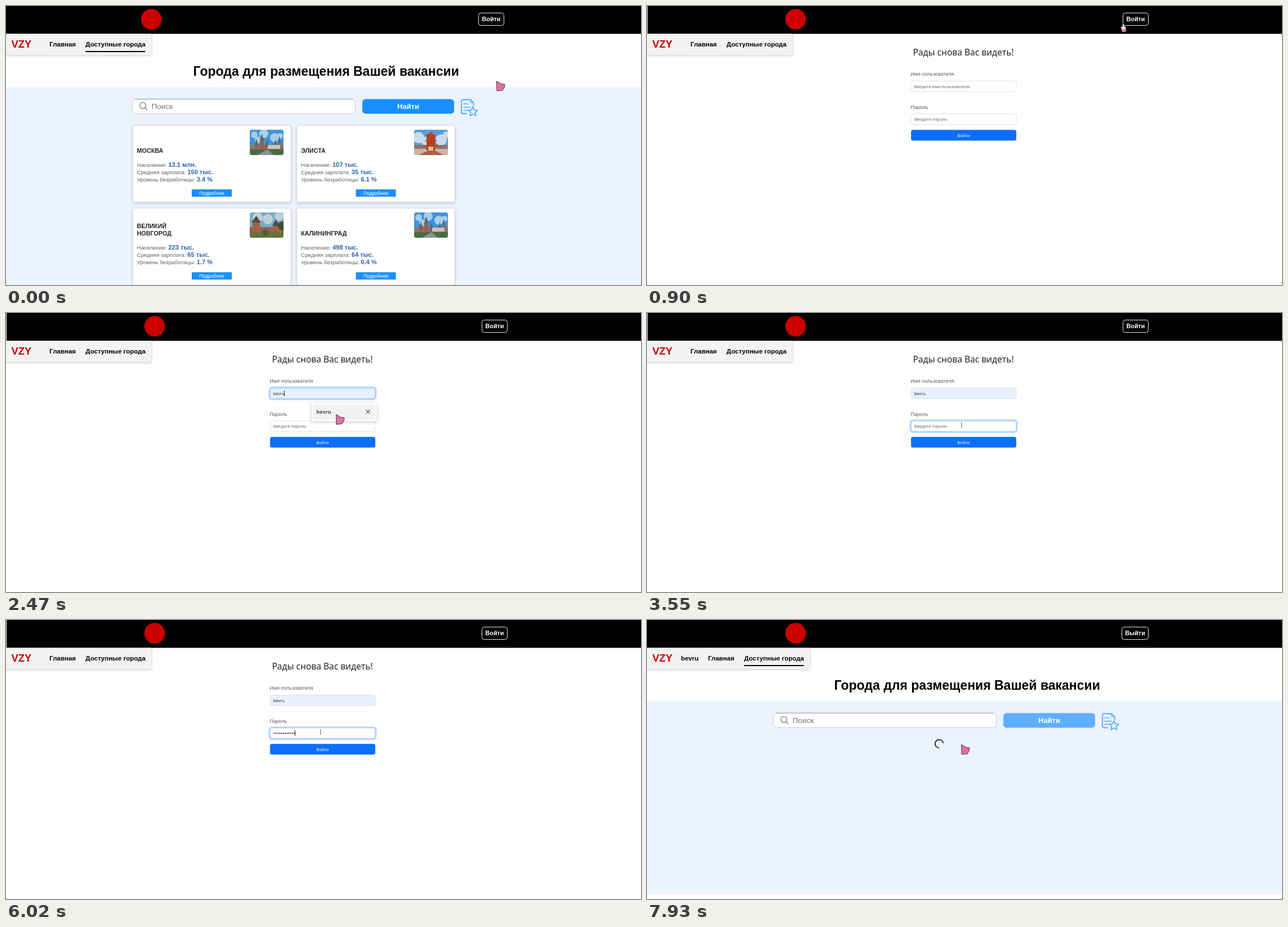
Write an HTML page with a canvas that moves like this. It is 1128 px wide and 496 px high and loops after 7990 ms.

```html
<!DOCTYPE html>
<html lang="ru">
<head>
<meta charset="utf-8">
<title>Города</title>
<style>
html, body { margin: 0; width: 100%; height: 100%; overflow: hidden; background: #fff; }
canvas { display: block; }
</style>
</head>
<body>
<canvas id="stage" width="1128" height="496"></canvas>
<script>
const ctx = document.getElementById('stage').getContext('2d');
const LOOP = 7990;
const ARIAL = '"Liberation Sans", Arial, sans-serif';
const NOTO = '"Noto Sans", "Open Sans", sans-serif';
const BRAND = 'VZY', USER = 'bevru';
const RED = '#cc0000', BLUE = '#1890ff', INK = '#212529';
const LOGIN_AT = 900, FOCUS_NAME = 1850, PICK = 2810, FOCUS_PASS = 3150, PRESS = 7300, CITIES_AT = 7790;
const KEY_TIMES = [3750, 3950, 4170, 4370, 4630, 4760, 4960, 5160, 5430, 5690, 5820, 6020];

// start, end, steps, target
const MOVES = [
  [70, 830, 11, 846, 33],
  [1160, 1850, 11, 596, 143],
  [2050, 2470, 7, 586, 180],
  [2880, 3150, 5, 558, 199],
  [6570, 7300, 12, 558, 221]
];

const CITIES = [
  { name: ['МОСКВА'], people: '13.1 млн.', pay: '150 тыс.', idle: '3.4 %', view: towers },
  { name: ['ЭЛИСТА'], people: '107 тыс.', pay: '35 тыс.', idle: '6.1 %', view: pagoda },
  { name: ['ВЕЛИКИЙ', 'НОВГОРОД'], people: '223 тыс.', pay: '65 тыс.', idle: '1.7 %', view: fortress },
  { name: ['КАЛИНИНГРАД'], people: '498 тыс.', pay: '64 тыс.', idle: '0.4 %', view: towers }
];

function rect(x, y, w, h, color) {
  ctx.fillStyle = color;
  ctx.fillRect(x, y, w, h);
}

function box(x, y, w, h, r, fill, stroke, line = 1) {
  ctx.beginPath();
  ctx.roundRect(x, y, w, h, r);
  if (fill) { ctx.fillStyle = fill; ctx.fill(); }
  if (stroke) { ctx.strokeStyle = stroke; ctx.lineWidth = line; ctx.stroke(); }
}

function shadowBox(x, y, w, h, r, fill, blur, dy, alpha) {
  ctx.save();
  ctx.shadowColor = `rgba(0,0,0,${alpha})`;
  ctx.shadowBlur = blur;
  ctx.shadowOffsetY = dy;
  box(x, y, w, h, r, fill);
  ctx.restore();
}

function poly(points, fill, stroke, line = 1) {
  ctx.beginPath();
  points.forEach(([x, y]) => ctx.lineTo(x, y));
  ctx.closePath();
  if (fill) { ctx.fillStyle = fill; ctx.fill(); }
  if (stroke) { ctx.strokeStyle = stroke; ctx.lineWidth = line; ctx.stroke(); }
}

function path(points, color, line) {
  ctx.beginPath();
  points.forEach(([x, y]) => ctx.lineTo(x, y));
  ctx.strokeStyle = color;
  ctx.lineWidth = line;
  ctx.stroke();
}

function disc(x, y, r, color) {
  ctx.beginPath();
  ctx.arc(x, y, r, 0, Math.PI * 2);
  ctx.fillStyle = color;
  ctx.fill();
}

function text(str, x, y, size, color, weight = 400, family = ARIAL, align = 'left') {
  ctx.font = `${weight} ${size}px ${family}`;
  ctx.textAlign = align;
  ctx.fillStyle = color;
  ctx.fillText(str, x, y);
  return ctx.measureText(str).width;
}

function header(left, logoX, label, buttonX, buttonW) {
  rect(left, 0, 1128, 49.5, '#000');
  disc(logoX, 23.5, 18.3, RED);
  box(buttonX, 12.5, buttonW, 22, 4, null, '#e8e8e8');
  text(label, buttonX + buttonW / 2, 27, 10.8, '#fff', 700, ARIAL, 'center');
}

function nav(width, items, underlined) {
  ctx.save();
  ctx.beginPath();
  ctx.rect(0, 49.5, 400, 60);
  ctx.clip();
  shadowBox(-6, 40, width + 6, 47, 0, '#f3f3f3', 5, 1, 0.22);
  ctx.restore();
  text(BRAND, 9.4, 74, 18.4, RED, 700);
  for (const [label, x] of items) text(label, x, 72, 11.5, '#000', 700);
  if (underlined) rect(items[items.length - 1][1], 80, 106, 2, '#000');
}

function towers(x, y) {
  rect(x, y, 60, 45, '#3f93d8');
  for (const [cx, cy, r] of [[8, 9, 6], [25, 7, 8], [44, 14, 8], [54, 11, 5], [15, 18, 6]])
    disc(x + cx, y + cy, r, '#a9cdec');
  rect(x, y + 27, 60, 12, '#8c7468');
  for (const [tx, top, w] of [[9, 19, 6], [18, 10, 7], [27, 21, 7], [43, 19, 5], [50, 14, 5]]) {
    rect(x + tx, y + top + 7, w, 20, '#9b5d50');
    poly([[x + tx, y + top + 8], [x + tx + w / 2, y + top - 3], [x + tx + w, y + top + 8]], '#566b68');
  }
  rect(x + 32, y + 27, 22, 7, '#c9c3b6');
  rect(x, y + 35, 60, 10, '#496c45');
  poly([[x + 14, y + 45], [x + 31, y + 35], [x + 43, y + 45]], '#88938f');
}

function pagoda(x, y) {
  rect(x, y, 60, 45, '#5b9dd2');
  for (const [cx, cy, r] of [[8, 14, 10], [22, 21, 9], [48, 18, 10], [57, 9, 6]])
    disc(x + cx, y + cy, r, '#c8dced');
  rect(x, y + 27, 60, 9, '#907566');
  rect(x, y + 34, 60, 11, '#d0b3a1');
  rect(x + 22, y + 8, 15, 29, '#b33d25');
  for (const [level, half] of [[8, 9], [17, 12], [27, 15]])
    poly([[x + 30 - half, y + level + 3], [x + 30, y + level - 4], [x + 30 + half, y + level + 3]], '#bd3f22');
  rect(x + 25, y + 30, 9, 9, '#e0c09c');
  poly([[x + 8, y + 45], [x + 25, y + 37], [x + 37, y + 37], [x + 52, y + 45]], '#b15d43');
}

function fortress(x, y) {
  rect(x, y, 60, 45, '#7aa9cb');
  for (const [cx, cy, r] of [[14, 9, 9], [32, 12, 9], [52, 7, 8]])
    disc(x + cx, y + cy, r, '#c2cdd3');
  rect(x, y + 26, 60, 11, '#996047');
  for (const [tx, top, w] of [[5, 14, 13], [42, 20, 9]]) {
    rect(x + tx, y + top + 3, w, 22, '#a2603f');
    poly([[x + tx - 2, y + top + 4], [x + tx + w / 2, y + top - 8], [x + tx + w + 2, y + top + 4]], '#514c46');
  }
  rect(x, y + 35, 60, 10, '#65713d');
  disc(x + 58, y + 24, 8, '#3d5032');
  disc(x + 28, y + 36, 6, '#4d5c35');
}

function photo(x, y, view) {
  ctx.save();
  ctx.beginPath();
  ctx.roundRect(x, y, 60, 45, 4);
  ctx.clip();
  view(x, y);
  ctx.restore();
}

function card(city, i) {
  const x = 225 + (i % 2) * 291.5, y = 212 + Math.floor(i / 2) * 147.3;
  shadowBox(x, y, 281, 137, 3, '#fff', 5, 1.5, 0.2);
  box(x + 0.2, y + 0.3, 280.6, 136.5, 3, null, '#cfd3d8', 0.8);
  photo(Math.round(x + 208.3), Math.round(y + 8), city.view);
  const left = x + 7.5;
  city.name.forEach((line, n) =>
    text(line, left, y + 49 - (city.name.length - 1 - n) * 13.3, 10.8, INK, 700));
  const rows = [['Население: ', city.people], ['Средняя зарплата: ', city.pay], ['Уровень безработицы: ', city.idle]];
  rows.forEach(([label, value], n) => {
    const base = y + 74 + n * 13;
    const w = text(label, left, base, 9.9, '#5c5f63');
    text(value, left + w, base, 11.07, '#2860b0', 700);
  });
  rect(x + 105, y + 114, 71, 13, BLUE);
  text('Подробнее', x + 140.5, y + 123.6, 8.63, '#fff', 400, ARIAL, 'center');
}

function savedIcon() {
  const color = '#4eaaf3';
  ctx.lineJoin = ctx.lineCap = 'round';
  path([[818, 191.5], [811, 191.5], [809, 189.5], [809, 168.5], [811, 166.5], [825, 166.5], [830.5, 172], [830.5, 177]], color, 1.8);
  path([[825, 167], [825, 172], [830, 172]], color, 1.2);
  path([[813, 174], [821, 174]], color, 1.6);
  path([[813, 180], [825, 180]], color, 1.6);
  path([[813, 185.5], [820, 185.5]], color, 1.6);
  const star = Array.from({ length: 10 }, (_, k) => {
    const a = -Math.PI / 2 + k * Math.PI / 5, r = k % 2 ? 4.1 : 8.6;
    return [829.5 + r * Math.cos(a), 188 + r * Math.sin(a)];
  });
  poly(star, '#ebf3fe', color, 1.7);
  ctx.lineJoin = 'miter';
  ctx.lineCap = 'butt';
}

function searchBar(busy) {
  text('Города для размещения Вашей вакансии', 568.7, 124, 23, '#000', 700, ARIAL, 'center');
  box(224.5, 165.5, 396, 26, 6, '#fff', '#c4c8cc');
  path([[229, 165.5], [616, 165.5]], '#8f9296', 1);
  ctx.beginPath();
  ctx.arc(243, 177, 5.3, 0, Math.PI * 2);
  ctx.strokeStyle = '#777';
  ctx.lineWidth = 1.3;
  ctx.stroke();
  path([[246.8, 180.8], [251, 185]], '#777', 1.4);
  text('Поиск', 258.4, 183, 13.66, '#70757a');
  box(633, 165.5, 163, 26, 6, busy ? '#61adff' : BLUE);
  text('Найти', 714.5, 183, 12.94, '#fff', 700, ARIAL, 'center');
  savedIcon();
}

function citiesPage() {
  rect(0, 144, 1128, 352, '#ebf3fe');
  header(0, 258, 'Войти', 839.5, 45);
  nav(258, [['Главная', 77.3], ['Доступные города', 141.3]], true);
  searchBar(false);
  CITIES.forEach(card);
}

function loadingPage(t) {
  rect(0, 144, 1128, 343.5, '#ebf3fe');
  header(0, 264, 'Выйти', 843.5, 47);
  nav(289, [[USER, 60.2], ['Главная', 108.4], ['Доступные города', 172.4]], true);
  searchBar(true);
  const a = Math.PI / 2 + (t - 7930) / 750 * Math.PI * 2;
  ctx.beginPath();
  ctx.arc(519, 220, 7.3, a, a + Math.PI * 1.45);
  ctx.strokeStyle = '#2b3035';
  ctx.lineWidth = 2;
  ctx.stroke();
}

function field(y, focused, fill) {
  if (focused) box(467.7, y - 1.3, 189.6, 21.6, 5, null, 'rgba(13,110,253,0.25)', 2.6);
  box(469, y, 187, 19, 4, fill, focused ? '#86b7fe' : '#d9dee3', 0.9);
}

function loginPage(t, cur) {
  const listOpen = t >= FOCUS_NAME && t < PICK;
  const hovered = listOpen && cur.y > 163;
  const filled = hovered || t >= PICK;
  const passFocus = t >= FOCUS_PASS && t < PRESS;
  const nameFocus = t >= FOCUS_NAME && t < FOCUS_PASS;
  const typed = KEY_TIMES.filter(k => t >= k).length;

  header(1, 264, 'Войти', 845.5, 45);
  nav(258, [['Главная', 77.3], ['Доступные города', 141.3]], false);
  text('Рады снова Вас видеть!', 562, 88, 15.5, INK, 500, NOTO, 'center');
  text('Имя пользователя', 468.3, 124, 9, '#5c5f63');
  text('Пароль', 468.3, 182.7, 9, '#5c5f63');

  field(133.3, nameFocus, filled ? '#e8f0fe' : '#fff');
  text(filled ? USER : 'Введите имя пользователя', 474.8, 145.5, 7.4, filled ? INK : '#5f656b', 400, NOTO);
  if (nameFocus) rect(filled ? 494 : 475, 137.5, 1, 10, '#222');

  field(191.8, passFocus, '#fff');
  if (!typed) text('Введите пароль', 474.8, 204, 7.4, '#5f656b', 400, NOTO);
  for (let i = 0; i < typed; i++) disc(476.7 + i * 3.25, 201.4, 1.05, INK);
  if (passFocus && (t < 3550 || (typed && t < 6570))) rect(475 + Math.round(typed * 3.2), 196, 1, 10, '#222');

  box(469, 220.3, 187, 19, 3.5, cur.y > 219 ? '#0b5ed7' : '#0d6efd');
  text('Войти', 562.3, 233, 7.4, '#fff', 400, NOTO, 'center');

  if (listOpen) {
    shadowBox(543, 160, 115.5, 32.5, 4, '#fff', 6, 1, 0.25);
    if (hovered) box(545.5, 163, 110.5, 26, 3, '#f1f1f1');
    text(USER, 551.3, 179, 9.1, '#4a4d50', 600, NOTO);
    path([[639.5, 172], [646.3, 178.8]], '#4a4d50', 1.1);
    path([[646.3, 172], [639.5, 178.8]], '#4a4d50', 1.1);
  }
}

function cursorAt(t) {
  let x = 871, y = 133;
  for (const [start, end, steps, tx, ty] of MOVES) {
    if (t < start) break;
    const step = Math.floor((t - start) / (end - start) * (steps - 1) + 0.01) + 1;
    const p = Math.min(1, step / steps), e = p * p * (3 - 2 * p);
    x += (tx - x) * e;
    y += (ty - y) * e;
  }
  return { x, y };
}

function drawCursor({ x, y }, t) {
  const onLogin = t >= LOGIN_AT && t < CITIES_AT;
  const inField = x > 469 && x < 656 && ((y > 133 && y < 153) || (y > 191 && y < 211));
  if (onLogin && inField) {
    rect(x + 0.3, y - 5, 1, 10, '#555');
  } else if (y < 35 && x > 838 && x < 891) {
    box(x - 3, y + 6, 8, 7, 3, '#e78aac');
    poly([[x - 1, y - 1], [x + 1, y - 1], [x + 1.5, y + 3], [x + 4.5, y + 4], [x + 4.5, y + 8],
      [x - 2.5, y + 9], [x - 4.5, y + 4], [x - 1.5, y + 4]], '#fff', '#333', 0.5);
  } else {
    poly([[x + 0.5, y + 0.5], [x + 9, y + 5.5], [x + 15, y + 6], [x + 14.5, y + 11],
      [x + 11, y + 17], [x + 1, y + 18]], '#e0709f', '#573348', 1);
  }
}

function frame(now) {
  const t = now % LOOP;
  const cur = cursorAt(t);
  rect(0, 0, 1128, 496, '#fff');
  if (t < LOGIN_AT) citiesPage();
  else if (t < CITIES_AT) loginPage(t, cur);
  else loadingPage(t);
  drawCursor(cur, t);
  requestAnimationFrame(frame);
}
requestAnimationFrame(frame);
</script>
</body>
</html>
```
